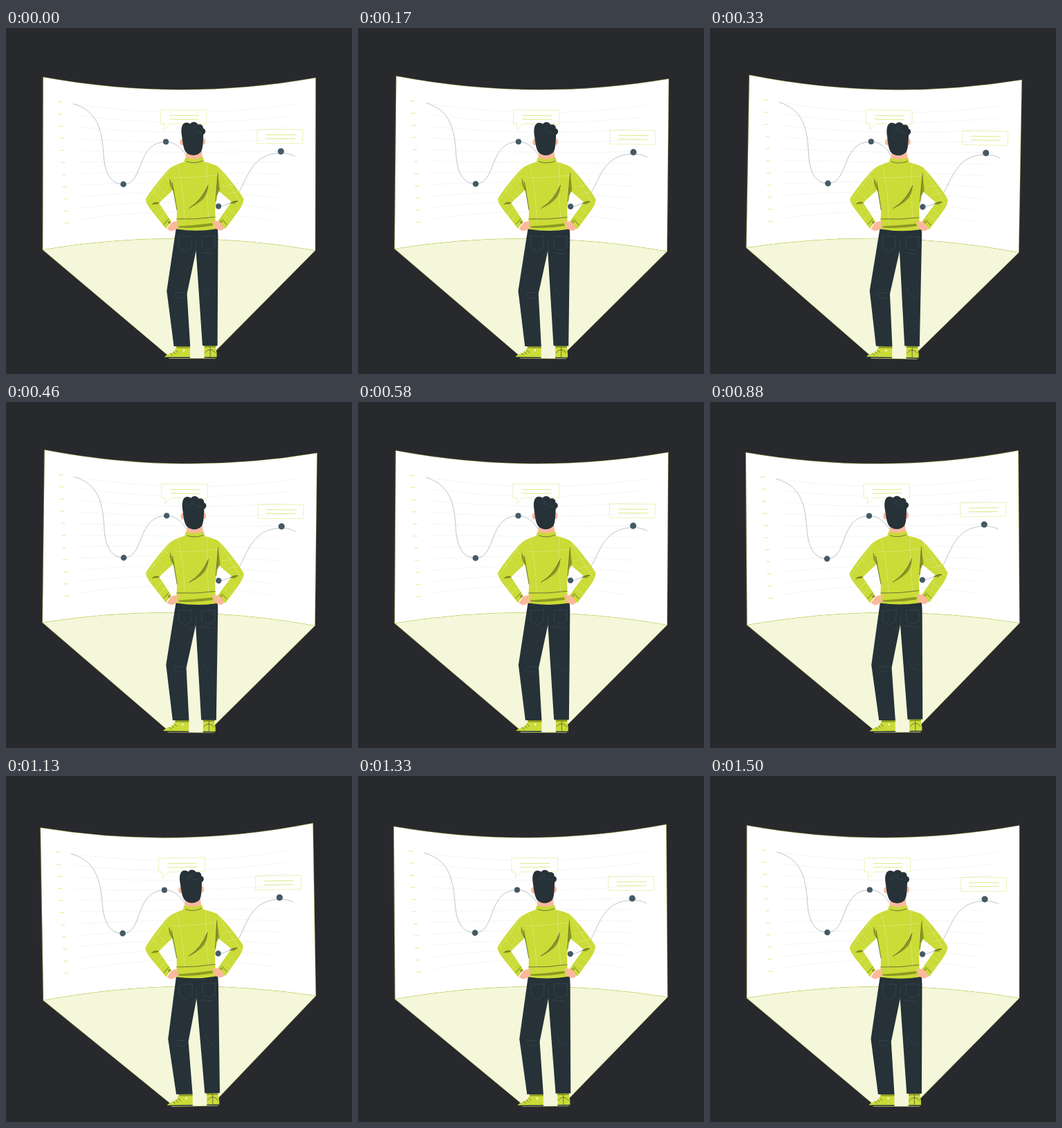
An HTML page for the animation above (1540 ms loop, 500 px wide and 500 px high).

```html
<!DOCTYPE html>
<html lang="en">
<head>
<meta charset="utf-8">
<style>
  html, body { margin: 0; height: 100%; overflow: hidden; background: #28292d; }
  svg { display: block; width: 100vw; height: 100vh; }
  path { stroke-linecap: round; stroke-linejoin: round; }
  .line { fill: none; stroke-width: .6; }
  .fine { stroke-width: .5; stroke-opacity: .7; }
  .lime { stroke: #cbdb37; }
  .grid { stroke: #eceef0; }
  .slate { stroke: #455a64; }
  .ink { stroke: #263238; }
  .pale { stroke: #e3ec8e; }
  .olive { fill: #8c9a22; }
  .skin { fill: #fbb89c; }
  .dark { fill: #263238; }
  .cloth { fill: #cbdb37; }
</style>
</head>
<body>
<svg viewBox="0 0 500 500">
  <g id="scene">
    <!-- screen and floor -->
    <path fill="#fff" class="lime fine" d="M53.3 71.5Q250 107 447 71.5V321Q250 287.5 53.3 321Z"/>
    <path fill="#f4f7da" class="lime fine" d="M53.3 321Q250 287.5 447 321L304 466 303 477.500H236V474.500Z"/>

    <!-- chart -->
    <path id="rows" class="line grid"/>
    <path id="ticks" class="line lime"/>
    <path class="line slate fine" d="M97 110C128 119 138 141 140.500 180C142 208 150 226 169.500 226C200 226 187 165 231 164.500C252 165 262 185 275 212"/>
    <path class="line slate fine" stroke-opacity=".5" d="M307 257.500C352 257 335 181 397 180.500Q410 180.500 417 185"/>
    <g fill="#455a64">
      <circle cx="169.500" cy="226" r="4.300"/>
      <circle cx="230.800" cy="164.500" r="4.100"/>
      <circle cx="307" cy="257.500" r="4.200"/>
      <circle cx="397" cy="178" r="4.600"/>
    </g>
    <path fill="#fff" class="lime fine" d="M223.500 118.500H289.500V138.500H237L228.500 147V138.500H223.500Z"/>
    <path class="line lime fine" d="M363 146.500H428.500V166.500H363Z"/>
    <path class="line lime" d="M236 126.500H278M236 132H278M375 154H418M375 159.500H417"/>

    <!-- head -->
    <path class="skin" d="M260.500 177H282.500L284 190H259.500Z"/>
    <ellipse class="skin" cx="254" cy="165" rx="2.800" ry="4.500"/>
    <ellipse class="skin" cx="285" cy="164" rx="2.800" ry="4.500"/>
    <path class="dark" d="M254 157C251 141 256 133 266 138.500C268 134.500 275 135 277 139.500C282 138 285 141 284.500 145C289 146 289 152 285 154C284.500 166 284.500 174 281.500 179C276 185.500 265 185.500 259.500 179C256 174 255 165 254 157Z"/>
    <path class="line slate" stroke-opacity=".6" d="M262 150q5-6 9-2t8 2M267 143q3 3 6 0M276 148q3 5 6 3"/>

    <!-- shoes -->
    <path class="cloth" d="M247 460H266.500V476H229Q232 472 238 470.500Q245 468 247 460Z M287 459H303L305 470V476H287Z"/>
    <path class="olive" d="M247 460H266.500V462.500H246.500Z M287 458.500H303.500V461.500H287Z"/>
    <path class="dark" d="M229 475.500H266.500V477H229Z M287 475.500H305V477H287Z"/>
    <path class="line ink" d="M238 470l3 3M242 468l3 3M246 466l3 3M295.500 461V475M288 469q7-9 15 0"/>
    <circle fill="#f4f7da" cx="257.500" cy="466" r="1.500"/>

    <!-- trousers -->
    <path class="dark" d="M246 288Q275 294 306 288L306.500 302L306 459H284.300L274.700 322L261.800 384L266.600 460H243L232.500 380Z"/>
    <path class="line slate" stroke-opacity=".7" d="M250.500 301H269L268 317L259 322L250 317Z M283.500 301L302 300.500V317L293 321L284 317Z
      M275 308V320Q272 326 268 329M282 324L298 326M244 382q8 1.500 14 0M244 385q5 9 13 4M286 376q4 10 12 12"/>

    <!-- sweater -->
    <path class="cloth" d="M259 187Q271 192 284.500 186.500L286.500 193.500Q300 196.500 306 200Q314 207 327 223.500Q338 237 343.500 247Q343 254 336 264L317 290L306 279L326 251L307 235L302 258L303 290.500Q275 295 246 290.500L247 264L241 234L221 253L239 280L231 290L208 261Q201 251 202 247Q210 233 233 206Q239 199 257 193.500Z"/>
    <path class="line pale" stroke-dasharray="5 .6" d="M248 199Q257 236 258 276M290 196Q289 236 293 275M243 216Q275 217 306 212M219 227L235 244M212 235L227 249M229 214L241 229M222 278L232 265M216 270L226 259M237 203L204 250M308 204L339 252M312 229L328 226M320 240L336 236M315 270L325 277M321 261L331 268"/>
    <path class="olive" d="M264.500 260.500Q283 249 292 227Q292 241 283 249Q275 256 264.500 260.500Z M237 218L243 237Q235 229 236 219Z M306 211L309 234 304 242Z M211 255Q215 251 221 253L218 255Z M335 250Q329 249 324 253L330 254Z M249 286.500Q274 285 298 282L299 285.500Q274 290 249 288.500Z"/>
    <path class="line ink" d="M261 193Q272 197 284 192M240 223L247 263M306 210L303 250M264.500 260.500Q283 249 292 227M247 276Q275 277 302 273M211 255q4-4 10-2M335 250q-6-1-11 3M228 284L235 276M319 284L312 276"/>
    <circle class="line ink" cx="236" cy="281" r="1.400"/>
    <circle class="line ink" cx="310.500" cy="280" r="1.400"/>

    <!-- hands -->
    <path class="skin" d="M232.500 290.500L239 281.500Q244 278 251 280L246 284L250 287.500Q244 293 238 293.500Z M316 289L310 280.500Q304 277 297 280L302 284L299 287Q305 292 311 292.500Z"/>
  </g>
</svg>
<script>
  const LOOP = 1540, STEPS = 37;
  const scene = document.getElementById('scene');
  let rows = '', ticks = '';
  for (let i = 0; i < 11; i++) {
    const y = 110 + 16.8 * i, x = 98 + 5 * Math.min(i, 1), end = 415 - 2.8 * i;
    rows += `M${x} ${y}Q${(x + end) / 2} ${y + 24 - 4.8 * i} ${end} ${y}`;
    ticks += `M${75 + i} ${107.3 + 17.5 * i}h5`;
  }
  document.getElementById('rows').setAttribute('d', rows);
  document.getElementById('ticks').setAttribute('d', ticks);

  // Triangle wave between -1 and 1, starting at 0 and rising.
  const triangle = p => 1 - 4 * Math.abs(((p + .25) % 1) - .5);

  function draw(now) {
    const step = Math.floor((now + 6) % LOOP / LOOP * STEPS);
    scene.setAttribute('transform', `rotate(${triangle((step + 1.2) / STEPS)} 250 278)`);
    requestAnimationFrame(draw);
  }
  draw(0);
</script>
</body>
</html>
```
